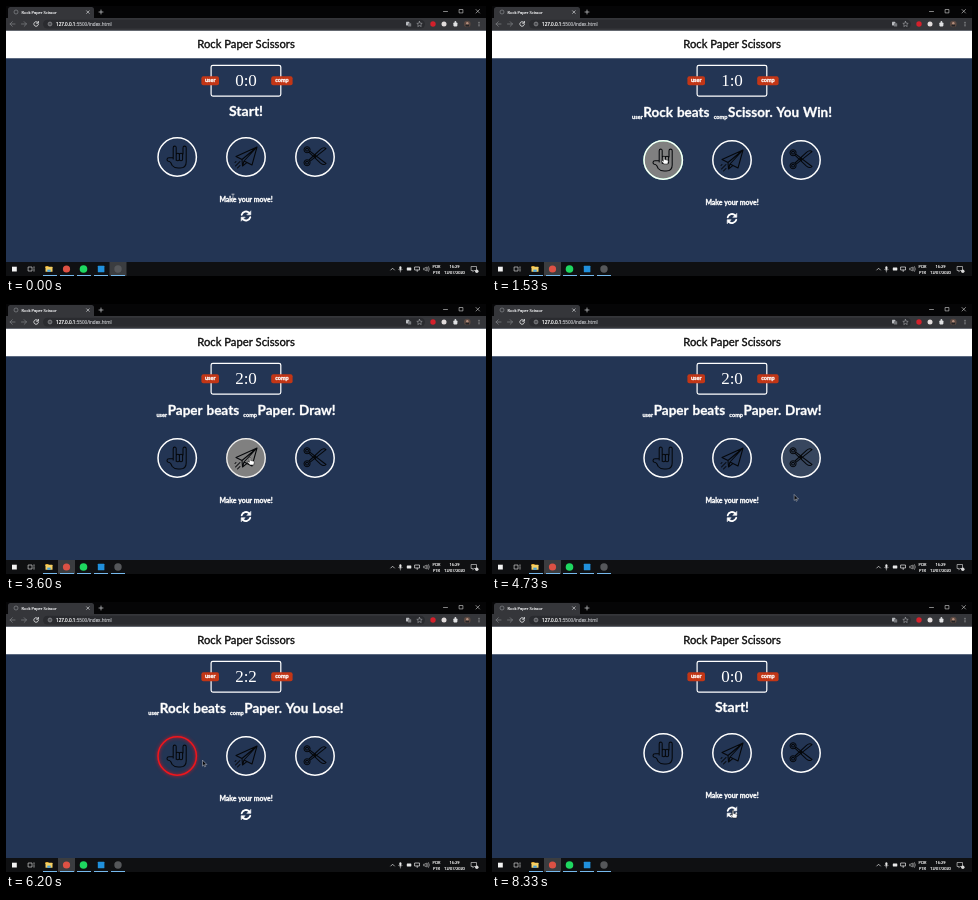
These frames come from a looping animation (480x270 px, 8.67 s). An HTML page with a canvas:

```html
<!DOCTYPE html>
<html lang="en">
<head>
<meta charset="utf-8">
<title>Rock Paper Scissor</title>
<style>
html, body { margin: 0; width: 100%; height: 100%; overflow: hidden; background: #233554; }
canvas { display: block; width: 480px; height: 270px; }
</style>
</head>
<body>
<canvas id="stage"></canvas>
<script>
const LOOP = 8670, RESET = 8260, FOCUS = 210, FADE = 300;
const BG = '#233554';
const canvas = document.getElementById('stage');
const ctx = canvas.getContext('2d');
const dpr = Math.max(1, window.devicePixelRatio || 1);
canvas.width = 480 * dpr;
canvas.height = 270 * dpr;

const PAGE = 'Lato, "Open Sans", sans-serif';
const UI = '"Open Sans", "Noto Sans", sans-serif';
const SERIF = '"Liberation Serif", serif';
const CX = [171.2, 240, 309];

// time, choice, score, user move, computer move, outcome
const plays = [
  [935, 0, '1:0', 'Rock', 'Scissor', 'You Win!'],
  [1900, 0, '1:0', 'Rock', 'Rock', 'Draw!'],
  [2360, 0, '2:0', 'Rock', 'Scissor', 'You Win!'],
  [3060, 1, '2:0', 'Paper', 'Paper', 'Draw!'],
  [5080, 2, '2:0', 'Scissor', 'Scissor', 'Draw!'],
  [5580, 1, '2:1', 'Paper', 'Scissor', 'You Lose!'],
  [5890, 0, '2:2', 'Rock', 'Paper', 'You Lose!'],
  [6860, 0, '3:2', 'Rock', 'Scissor', 'You Win!']
];
const glowColor = { 'You Win!': [77, 204, 125], 'You Lose!': [240, 20, 27], 'Draw!': [70, 70, 71] };

// pointer path: time, x, y
const path = [
  [0, 227, 191], [150, 227, 191], [760, 172, 151], [2450, 172, 151],
  [2830, 244, 154], [3780, 244, 154], [4000, 312, 157], [4400, 312, 157],
  [4700, 302, 192], [4990, 306, 156], [5090, 304, 156], [5190, 288, 157],
  [5400, 257.2, 155.5], [5530, 245, 155], [5640, 243, 155], [5830, 179, 155],
  [5900, 181, 156], [5960, 193, 159], [6200, 196.5, 158.5], [6450, 199, 190],
  [6740, 173, 152], [7000, 173, 152], [7530, 248.4, 207.8], [7700, 248.4, 207.8],
  [8060, 241, 209], [LOOP, 241, 209]
];

const clamp = v => Math.min(1, Math.max(0, v));
const ease = v => { v = clamp(v); return v * v * (3 - 2 * v); };
const rgb = c => `rgb(${c.map(Math.round).join()})`;
const mix = (a, b, k) => a.map((v, i) => v + (b[i] - v) * k);

function pointer(t) {
  const i = Math.max(1, path.findIndex(p => p[0] >= t));
  const [t0, x0, y0] = path[i - 1], [t1, x1, y1] = path[i];
  const k = ease((t - t0) / (t1 - t0));
  return [x0 + (x1 - x0) * k, y0 + (y1 - y0) * k];
}

const playing = t => t >= plays[0][0] && t < RESET;
const shift = t => playing(t) ? 3 : 0;

function over(i, t) {
  const [x, y] = pointer(t);
  return Math.hypot(x - CX[i], y - 151 - shift(t)) < 17;
}

function hovers(t) {
  const h = [0, 0, 0];
  for (let s = 0; s <= t; s += 10)
    for (let i = 0; i < 3; i++) h[i] = clamp(h[i] + (over(i, s) ? 10 : -10) / FADE);
  return h.map(ease);
}

function text(s, x, y, font, color, align = 'left', weight = .2) {
  ctx.font = font;
  ctx.fillStyle = ctx.strokeStyle = color;
  ctx.textAlign = align;
  ctx.fillText(s, x, y);
  if (!weight) return;
  ctx.lineWidth = weight;
  ctx.lineJoin = 'round';
  ctx.strokeText(s, x, y);
}

function rect(x, y, w, h, color, r = 0) {
  ctx.fillStyle = color;
  ctx.beginPath();
  ctx.roundRect(x, y, w, h, r);
  ctx.fill();
}

function disc(x, y, r, color) {
  ctx.fillStyle = color;
  ctx.beginPath();
  ctx.arc(x, y, r, 0, 7);
  ctx.fill();
}

function ring(x, y, r, color, width) {
  ctx.strokeStyle = color;
  ctx.lineWidth = width;
  ctx.beginPath();
  ctx.arc(x, y, r, 0, 7);
  ctx.stroke();
}

function line(d, color, width, x = 0, y = 0, fill) {
  const p = new Path2D(d);
  ctx.save();
  ctx.translate(x, y);
  ctx.lineJoin = ctx.lineCap = 'round';
  if (fill) { ctx.fillStyle = fill; ctx.fill(p); }
  ctx.strokeStyle = color;
  ctx.lineWidth = width;
  ctx.stroke(p);
  ctx.restore();
}

function browser() {
  rect(0, 0, 480, 12, '#050506');
  rect(2, 1, 86, 12, '#35363a', [2.5, 2.5, 0, 0]);
  rect(0, 12, 480, 12.8, '#35363a');
  ring(10, 6, 2, '#85878b', .7);
  text('Rock Paper Scissor', 15.6, 7.6, `4px ${UI}`, '#e8e9eb');
  line('M80.6 4.8l2.6 2.6m0-2.6l-2.6 2.6M93 6h4m-2-2v4', '#d0d1d4', .7);
  line('M437.5 5.5h4M470 3.5l3.5 3.5m0-3.5l-3.5 3.5M453.5 3.5h3.4v3.4h-3.4z', '#d8d8d8', .6);
  line('M9 18H4m2.3-2.3L4 18l2.3 2.3M15.5 18h5m-2.3-2.3l2.3 2.3-2.3 2.3', '#77797d', .8);
  line('M32 16.6a2.3 2.3 0 1 0 .4 1.9M32.4 15.4v1.8h-1.8', '#e0e1e3', .9);
  rect(37, 13.7, 382, 8.8, '#2a2b2f', 4.4);
  ring(44, 18, 1.9, '#b5b7bb', .6);
  line('M44 17.8v1.1M44 16.9v.05', '#b5b7bb', .6);
  const font = `4.6px ${UI}`;
  text('127.0.0.1', 50, 19.7, font, '#fff');
  text(':5500/index.html', 50 + ctx.measureText('127.0.0.1').width, 19.7, font, '#b4b6ba');
  rect(400, 15.8, 3.2, 3.6, '#b9bbbf', .4);
  rect(402, 17.2, 3.2, 3.4, '#77797d', .4);
  line('M413.5 15.4l.8 1.8 1.9.2-1.4 1.3.4 1.9-1.7-1-1.7 1 .4-1.9-1.4-1.3 1.9-.2z', '#b9bbbf', .5);
  disc(427, 18, 2.7, '#d4202b');
  disc(438, 18, 2.5, '#e2dcdc');
  rect(447.4, 16.4, 4, 4, '#e0e1e3', .8);
  disc(449.4, 16, .9, '#e0e1e3');
  disc(461.3, 18, 3.3, '#5b4942');
  disc(461.3, 17.2, 1.2, '#b58f7d');
  rect(459.5, 18.7, 3.6, 1.9, '#222326', .9);
  for (const y of [16.2, 18, 19.8]) disc(473, y, .5, '#d5d6d8');
}

function taskbar(t) {
  rect(0, 256, 480, 14, '#0f1012');
  rect(t < FOCUS ? 103.5 : 52, 256, 17, 14, '#3b3d40');
  rect(6, 260.7, 4.8, 4.8, '#f2f2f2');
  line('M22.5 261h3.5v4h-3.5zM28 260.8v1.2m0 1v2.2', '#d0d0d0', .7);
  rect(39.5, 260, 3, 2, '#d99a22', .4);
  rect(39.5, 260.8, 7, 5, '#f5cf62', .4);
  rect(41.3, 263.6, 3.4, 2.2, '#4aa3dc');
  disc(60.5, 263, 3.6, '#dd5144');
  disc(77.5, 263, 3.8, '#1ed760');
  rect(91.8, 259.7, 6.6, 6.6, '#2090dc', .5);
  disc(112, 263, 3.7, '#55575a');
  for (const x of [37, 54, 71, 88, 105]) rect(x, 269, 14, 1, '#76b9ed');

  const c = '#e8e8e8';
  line('M384.8 264l1.8-1.8 1.8 1.8', c, .7);
  rect(393.4, 260.3, 2, 3.7, c, 1);
  line('M392.6 263.3q1.8 2.8 3.6 0M394.4 264.8v1.2', c, .5);
  rect(400.8, 261.5, 4.5, 3, c, .4);
  line('M409 261h4.5v3H409zM411.2 264v1.5', c, .7);
  line('M418 262.2h1l1.3-1.2v4l-1.3-1.2h-1zM421.5 261.5q1.2 1.5 0 3m1-4q2 2.5 0 5', c, .5);
  const font = `3.9px ${UI}`;
  text('POR', 430.5, 261.7, font, c, 'center');
  text('PTB', 430.5, 267.5, font, c, 'center');
  text('16:29', 448.5, 261.7, font, c, 'center');
  text('12/07/2020', 448.5, 267.5, font, c, 'center');
  line('M465.5 260.5h5v4h-2.5l-1.2 1.2v-1.2h-1.3z', c, .6);
  disc(470.8, 265.2, 1.7, '#d8d8d8');
}

function scoreboard(score) {
  ctx.strokeStyle = '#fff';
  ctx.lineWidth = 1.2;
  ctx.beginPath();
  ctx.roundRect(205.1, 59.3, 69.7, 30.8, 1.8);
  ctx.stroke();
  text(score, 240, 80.3, `17px ${SERIF}`, '#fff', 'center', 0);
  for (const [label, x, w] of [['user', 195.4, 17.6], ['comp', 265.2, 21.4]]) {
    rect(x, 70.3, w, 9, '#c23616', 2);
    text(label, x + w / 2, 76.4, `bold 5.5px ${PAGE}`, '#fff', 'center', .3);
  }
}

function result(play) {
  const big = `bold 13.5px ${PAGE}`, small = `bold 5.6px ${PAGE}`;
  if (!play) return text('Start!', 240, 110, `bold 14px ${PAGE}`, '#fff', 'center', .3);
  const [, , , user, comp, outcome] = play;
  const parts = [
    ['user', small, 2.9, .6], [`${user} beats`, big, 0, 4.2],
    ['comp', small, 2.9, .6], [`${comp}. ${outcome}`, big, 0, 0]
  ];
  ctx.wordSpacing = '0.6px';
  const widths = parts.map(([s, f, , gap]) => {
    ctx.font = f;
    return ctx.measureText(s).width + gap;
  });
  let x = 240 - widths.reduce((a, b) => a + b) / 2;
  parts.forEach(([s, f, dy], i) => {
    text(s, x, 110.5 + dy, f, '#fff', 'left', .3);
    x += widths[i];
  });
  ctx.wordSpacing = '0px';
}

const icons = [
  'M-4 2V-9.3q0-1.6 1.5-1.6t1.5 1.6V-3M-1 3.3V-2.2q0-1.5 1.6-1.5t1.6 1.5v4.5q0 1.4-1.6 1.4T-1 2.3' +
  'M2.2-2.2q0-1.5 1.6-1.5T5.4-2.2v4.5q0 1.4-1.6 1.4T2.2 2.3M5.8-3V-9.3q0-1.6 1.6-1.6T9-9.3V5q0 6-6 6H1' +
  'Q-3 11-5 8.5L-6.5 5.5Q-7.5 4.2-8.8 4.2-10.3 4-10.2 2.4-10 .7-8 .8H-4',
  'M11-10L-10-.5-4 2.5 11-10-2 4 6 8zM-4 2.5L-3.5 9-2 4M-3.5 9L.8 5.6M-6 4.5l-4.5 4.5M-6 8.5l-2.5 2.5M-10 4.5l-1 1',
  'M-8-10.3a3 3 0 1 0 .1 0zM-8-8.7a1.4 1.4 0 1 0 .1 0zM-8 2.7a3 3 0 1 0 .1 0zM-8 4.3a1.4 1.4 0 1 0 .1 0z' +
  'M-5.2-5.9L11 6.5Q9 8.8 5.5 6.2L-5.9-4.6M-5.2 4.3L11-8.3Q9-10.5 5.5-7.7L-6 3M0-.9a.8.8 0 1 0 .1 0'
];

function choice(i, t, dy, hover) {
  let border = [255, 255, 255], amount = 0, tint = border;
  for (const [at, who, , , , outcome] of plays) {
    const d = t - at;
    if (who !== i || d < 0 || d > 2 * FADE) continue;
    amount = ease(d < FADE ? d / FADE : 2 - d / FADE);
    tint = glowColor[outcome];
    border = mix([255, 255, 255], tint, amount);
  }
  const x = CX[i], y = 151 + dy;
  if (hover > 0) disc(x, y, 19.2, `rgba(128,128,128,${hover})`);
  ctx.save();
  if (amount > 0) {
    ctx.shadowColor = rgb(tint);
    ctx.shadowBlur = 3.5 * amount * dpr;
  }
  ring(x, y, 19.2, rgb(border), 1.5);
  ctx.restore();
  line(icons[i], '#05070a', 1.05, x, y);
}

function refresh(y) {
  line('M-4.3-1.2A4.5 4.5 0 0 1 3.2-3.2M4.3 1.2A4.5 4.5 0 0 1-3.2 3.2', '#fff', 1.8, 240, y);
  line('M4.8-4.8v3.6H1.2zM-4.8 4.8V1.2h3.6z', '#fff', .6, 240, y, '#fff');
}

function cursor(t, dy) {
  const [x, y] = pointer(t);
  const hand = CX.some((_, i) => over(i, t)) || Math.hypot(x - 240, y - 210 - dy) < 6;
  const beam = Math.abs(x - 240) < 27 && Math.abs(y - 193 - dy) < 4;
  if (hand) {
    line('M-.7 4V.2q0-.8.7-.8t.7.8V2.5l2.6.5q1 .2 1 1.2L3.7 7H0L-2.3 4.3q-.3-.9.6-.9z', '#111', .5, x, y, '#fff');
  } else if (beam) {
    line('M-1.2-2.8h2.4M0-2.8v5.6M-1.2 2.8h2.4', '#e8e8e8', .6, x, y);
  } else {
    line('M0 0v5.6l1.3-1.2.9 2 .9-.4-.9-1.9h1.8z', '#c4c8d0', .5, x, y, '#08090c');
  }
}

function draw(t) {
  ctx.setTransform(dpr, 0, 0, dpr, 0, 0);
  rect(0, 0, 480, 270, BG);
  browser();
  rect(0, 24.8, 480, 27.4, '#fff');
  text('Rock Paper Scissors', 240, 42.4, `11.25px ${PAGE}`, '#0b0b0b', 'center', .35);
  taskbar(t);

  const play = playing(t) ? plays.filter(p => p[0] <= t).pop() : null;
  const dy = shift(t), h = hovers(t);
  scoreboard(play ? play[2] : '0:0');
  result(play);
  for (let i = 0; i < 3; i++) choice(i, t, dy, h[i]);
  text('Make your move!', 240, 195.8 + dy, `bold 6.9px ${PAGE}`, '#fff', 'center', .35);
  refresh(210 + dy * .85);
  cursor(t, dy);
}

const start = performance.now();
function tick() {
  draw((performance.now() - start) % LOOP);
  requestAnimationFrame(tick);
}
tick();
</script>
</body>
</html>
```
